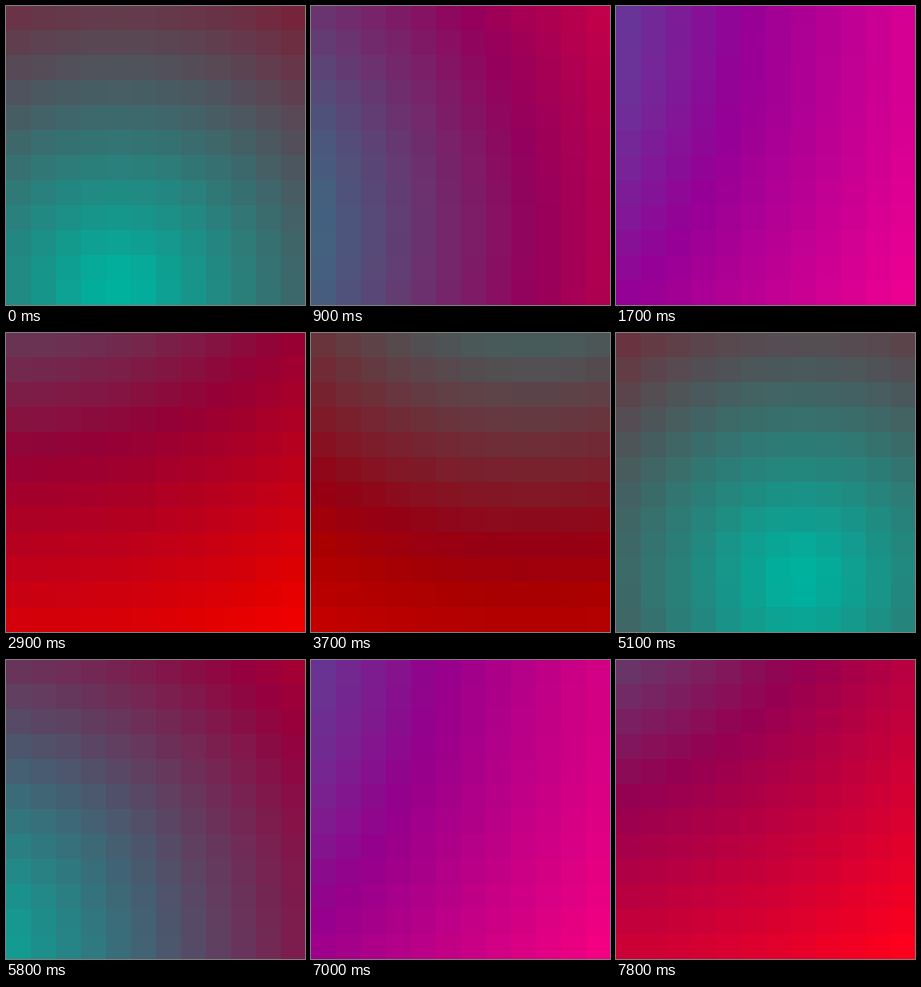
Recreate the animation shown at these times as an HTML page with a canvas. Size 299 px wide and 299 px high, loop 8 s.

```html
<!DOCTYPE html>
<html lang="en">
<head>
<meta charset="utf-8">
<title>Colour grid</title>
<style>
  html, body { margin: 0; width: 100%; height: 100%; overflow: hidden; }
  canvas { display: block; }
</style>
</head>
<body>
<canvas id="stage" width="299" height="299"></canvas>
<script>
const SIZE = 299, CELLS = 12, PITCH = SIZE / CELLS;
const LOOP = 8000, TICK = 100, POSES = 44;
const ORBIT = 289;              // distance of the focus from the first cell
const START = 70, TURN = 540;   // degrees at the start and per loop

const ctx = document.getElementById('stage').getContext('2d');
const channel = v => Math.round(Math.max(0, Math.min(255, v)));
const left = col => Math.ceil(col * PITCH);
const top_ = row => Math.floor(row * PITCH);

// Poses are evenly spaced, but only switch on whole ticks.
function poseAt(ms) {
  const tick = Math.floor(ms / TICK);
  return Math.ceil((tick + 1) * POSES * TICK / LOOP) - 1;
}

function draw(pose) {
  const angle = (START + TURN * pose / POSES) * Math.PI / 180;
  const fx = ORBIT * Math.cos(angle), fy = ORBIT * Math.sin(angle);
  const fade = 0.05 + 0.95 * Math.abs(Math.cos(angle / 2));

  for (let row = 0; row < CELLS; row++) {
    for (let col = 0; col < CELLS; col++) {
      const distance = Math.hypot(col * PITCH - fx, row * PITCH - fy);
      const r = Math.max(0, 0.385 * distance - 6);
      const g = 177 - 1.19 * r;
      const b = 158 - fade * r;
      const x = left(col), y = top_(row);
      ctx.fillStyle = `rgb(${channel(r)}, ${channel(g)}, ${channel(b)})`;
      ctx.fillRect(x, y, left(col + 1) - x, top_(row + 1) - y);
    }
  }
}

const origin = performance.now();
let shown = -1;

function frame() {
  const pose = poseAt((performance.now() - origin) % LOOP);
  if (pose !== shown) draw(shown = pose);
  requestAnimationFrame(frame);
}
frame();
</script>
</body>
</html>
```
